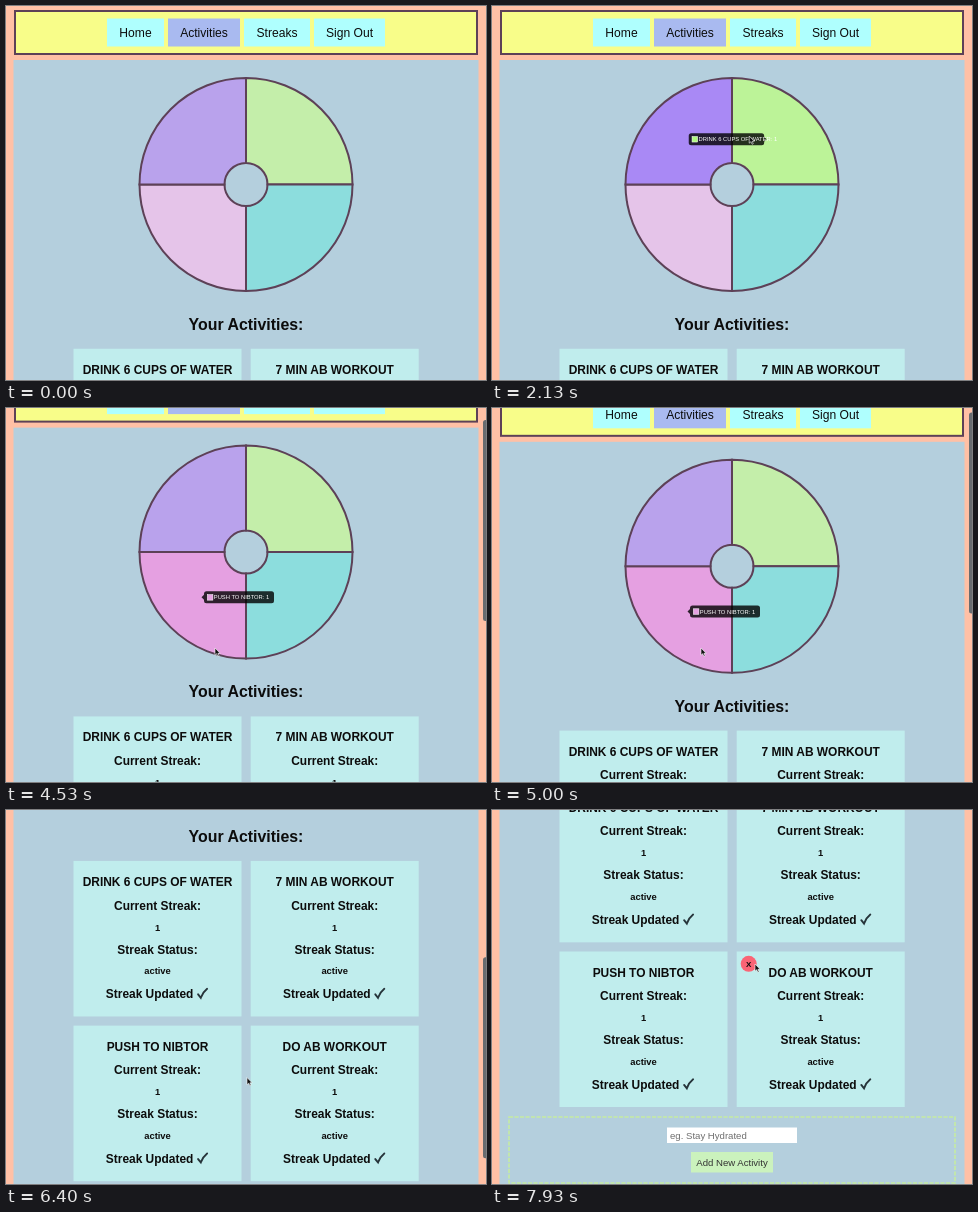
These frames come from a looping animation (480x374 px, 8 s). An HTML page:

```html
<!DOCTYPE html>
<html lang="en">
<head>
<meta charset="utf-8">
<title>Activities</title>
<style>
  html, body { margin: 0; width: 100%; height: 100%; overflow: hidden; background: #ffc0a5; }
  svg { display: block; width: 480px; height: 374px; }
  text { font-family: "Liberation Sans", Arial, sans-serif; fill: #0c0c0c; }
  .mid { text-anchor: middle; }
  .nav { font-size: 12.1px; }
  .heading { font-size: 15.9px; font-weight: bold; }
  .label { font-size: 11.95px; font-weight: bold; }
  .value { font-size: 9.4px; font-weight: bold; }
  .tip { font-size: 5.8px; fill: #fff; }
  .line { stroke: #5d4157; stroke-width: 2; }
</style>
</head>
<body>
<svg viewBox="0 0 480 374">
  <g id="page">
    <rect x="9" y="5" width="462" height="43" fill="#f8fd89" class="line"/>
    <g id="nav"></g>
    <rect x="7.5" y="54" width="465" height="700" fill="#b4cfdd"/>
    <g id="wheel" class="line"></g>
    <text class="heading mid" x="240" y="323.8">Your Activities:</text>
    <g id="cards"></g>
    <rect x="17" y="673" width="446" height="66" fill="none" stroke="#c6eba2" stroke-width="1.6" stroke-dasharray="4 1.5"/>
    <rect x="175" y="683.5" width="130" height="15.5" fill="#fff"/>
    <text x="178" y="694.8" style="font-size:9.6px;fill:#6e6e6e">eg. Stay Hydrated</text>
    <rect x="199" y="708" width="82" height="20.5" fill="#cbf2bd"/>
    <text class="mid" x="240" y="721.8" style="font-size:9.6px;fill:#333">Add New Activity</text>
    <g id="tooltip">
      <rect id="tipBox" height="12" rx="2.5" fill="#000" fill-opacity=".8"/>
      <path id="tipArrow" fill="#000" fill-opacity=".8"/>
      <rect id="tipKey" x="3.3" y="3.2" width="5.6" height="5.6" stroke="#fff" stroke-width=".5"/>
      <text id="tipText" class="tip" x="9.8" y="8.1"></text>
    </g>
    <g id="remove">
      <circle r="8" fill="#fa6475"/>
      <text class="mid" y="3" style="font-size:8px;font-weight:bold">X</text>
    </g>
  </g>
  <rect id="scrollbar" x="477" width="6" height="201" rx="2.5" fill="#686c70"/>
  <path id="cursor" d="M0 0V7.2L1.7 5.7 2.9 8.3 4.1 7.7 2.9 5.3H5.1Z" fill="#111" stroke="#fff" stroke-width=".6"/>
</svg>
<script>
const LOOP = 8000;
const CENTER = { x: 240, y: 178.5 }, OUTER = 106.5, INNER = 21.5;
const CARD = { w: 168, h: 155.5 };
const $ = id => document.getElementById(id);

function add(parent, tag, attrs, text = '') {
  const el = document.createElementNS('http://www.w3.org/2000/svg', tag);
  for (const key in attrs) el.setAttribute(key, attrs[key]);
  el.textContent = text;
  parent.append(el);
  return el;
}

// Clockwise from the top; left and width describe the tooltip box.
const slices = [
  { name: 'DRINK 6 CUPS OF WATER', color: [196, 238, 170], hover: [176, 250, 128], left: 195, width: 87 },
  { name: '7 MIN AB WORKOUT', color: [140, 221, 221], hover: [95, 243, 240], left: 205, width: 77 },
  { name: 'PUSH TO NIBTOR', color: [229, 196, 233], hover: [229, 160, 225], left: 198, width: 70 },
  { name: 'DO AB WORKOUT', color: [185, 162, 236], hover: [158, 118, 251], left: 198, width: 67 },
];
const hovers = [[0, -1], [1260, 3], [2080, 0], [2735, 1], [3500, 2], [5575, 1], [6200, -1]];

const scrollKeys = [[0, 0], [4400, 0], [4530, 34.3], [4680, 48], [4850, 38], [5150, 2.6], [6130, 2.6],
  [6250, 110], [6400, 291.5], [6550, 345], [6750, 366]];
const cursorKeys = [[1200, 223, 130], [1500, 195, 125], [1950, 205, 130], [2250, 285, 130], [2600, 297, 160],
  [3000, 286, 223], [3300, 284, 225], [3650, 220, 225], [4000, 200, 225], [4400, 209, 240],
  [5350, 209, 240], [5620, 241, 267.5], [7000, 241, 267.5], [7450, 300, 200], [7800, 263, 154]];

const mix = (a, b, p) => a + (b - a) * p;
const clamp = v => Math.min(1, Math.max(0, v));
const smooth = p => p * p * (3 - 2 * p);
const outQuart = p => 1 - (1 - p) ** 4;

function sample(keys, t, ease = p => p) {
  const i = keys.findIndex(k => k[0] > t);
  if (i === 0) return keys[0].slice(1);
  if (i < 0) return keys[keys.length - 1].slice(1);
  const a = keys[i - 1], b = keys[i];
  const p = ease((t - a[0]) / (b[0] - a[0]));
  return a.slice(1).map((v, n) => mix(v, b[n + 1], p));
}

function buildNav() {
  [['Home', 101, 57], ['Activities', 162, 72], ['Streaks', 238, 66], ['Sign Out', 308, 71]].forEach(([name, x, width], i) => {
    add($('nav'), 'rect', { x, y: 12.5, width, height: 28, fill: i === 1 ? '#a9baf0' : '#affffe' });
    add($('nav'), 'text', { x: x + width / 2, y: 30.9, class: 'nav mid' }, name);
  });
}

function buildWheel() {
  const point = (r, a) => `${CENTER.x + r * Math.sin(a)} ${CENTER.y - r * Math.cos(a)}`;
  slices.forEach((slice, i) => {
    const a = i * Math.PI / 2, b = a + Math.PI / 2;
    slice.el = add($('wheel'), 'path', {
      d: `M${point(INNER, a)}L${point(OUTER, a)}A${OUTER} ${OUTER} 0 0 1 ${point(OUTER, b)}` +
         `L${point(INNER, b)}A${INNER} ${INNER} 0 0 0 ${point(INNER, a)}Z`
    });
  });
}

const cards = slices.map((slice, i) => ({
  name: slice.name, x: i % 2 ? 244.7 : 67.5, y: i < 2 ? 342.8 : 507.5
}));

function buildCards() {
  for (const { name, x, y } of cards) {
    const g = add($('cards'), 'g', { transform: `translate(${x} ${y})` });
    add(g, 'rect', { width: CARD.w, height: CARD.h, fill: '#c0eded' });
    [[name, 25], ['Current Streak:', 48.7], ['1', 69.6, 'value'], ['Streak Status:', 92.6], ['active', 113.2, 'value']]
      .forEach(([text, row, kind = 'label']) => add(g, 'text', { x: CARD.w / 2, y: row, class: kind + ' mid' }, text));
    add(g, 'text', { x: 32.3, y: 137.4, class: 'label' }, 'Streak Updated');
    add(g, 'path', { d: 'M124.6 133.4L127.3 136.8Q129.5 131 133.6 127.8', fill: 'none', stroke: '#26343a', 'stroke-width': 1.9, 'stroke-linecap': 'round' });
  }
}

function drawHover(t) {
  const step = hovers.findLastIndex(h => h[0] <= t);
  const [start, now] = hovers[step];
  const before = step ? hovers[step - 1][1] : -1;
  const p = outQuart(clamp((t - start) / 400));

  slices.forEach((slice, i) => {
    const amount = i === now ? p : i === before ? 1 - p : 0;
    slice.el.setAttribute('fill', `rgb(${slice.color.map((c, n) => mix(c, slice.hover[n], amount))})`);
  });

  const shown = now < 0 ? before : now;
  $('tooltip').style.opacity = now < 0 ? (before < 0 ? 0 : 1 - p) : before < 0 ? p : 1;
  if (shown < 0) return;
  const tipY = i => CENTER.y + (i === 1 || i === 2 ? 45.25 : -45.25);
  const to = slices[shown], from = now < 0 || before < 0 ? to : slices[before];
  const x = mix(from.left, to.left, p);
  const y = mix(tipY(slices.indexOf(from)), tipY(shown), p) - 6;
  const width = mix(from.width, to.width, p);
  $('tooltip').setAttribute('transform', `translate(${x} ${y})`);
  $('tipBox').setAttribute('width', width);
  $('tipArrow').setAttribute('d', shown < 2 ? `M${width} 3.5l2.5 2.5-2.5 2.5Z` : 'M0 3.5l-2.5 2.5 2.5 2.5Z');
  $('tipKey').setAttribute('fill', `rgb(${to.hover})`);
  $('tipText').textContent = to.name + ': 1';
}

function draw(t) {
  const [scroll] = sample(scrollKeys, t);
  const [x, y] = sample(cursorKeys, t, smooth);
  $('page').setAttribute('transform', `translate(0 ${-scroll})`);
  $('cursor').setAttribute('transform', `translate(${x} ${y})`);
  $('cursor').style.opacity = t < 1070 ? 0 : 1;

  $('scrollbar').setAttribute('y', 147 + (scroll - 291.5) * 0.525);
  const fade = (from, to) => t < from ? 0 : 1 - clamp((t - to) / 200);
  $('scrollbar').style.opacity = Math.max(fade(4410, 5300), fade(6140, 7050));

  const over = cards.find(c => x >= c.x && x <= c.x + CARD.w && y + scroll >= c.y && y + scroll <= c.y + CARD.h);
  $('remove').style.opacity = over && t > 6750 ? 1 : 0;
  if (over) $('remove').setAttribute('transform', `translate(${over.x + 12} ${over.y + 12.3})`);
  drawHover(t);
}

buildNav();
buildWheel();
buildCards();
const begin = performance.now();
function tick() {
  draw((performance.now() - begin) % LOOP);
  requestAnimationFrame(tick);
}
tick();
</script>
</body>
</html>
```
